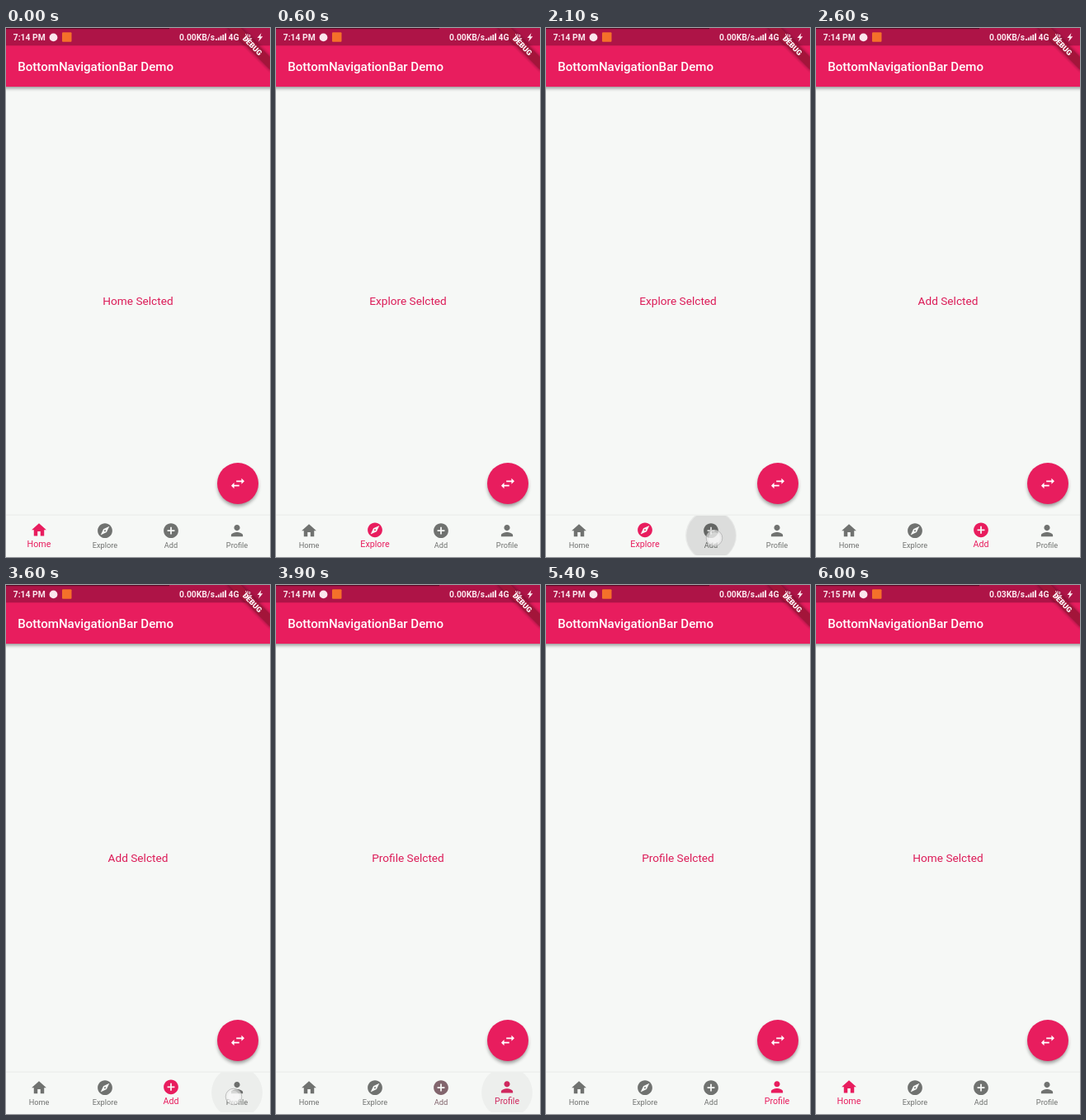
Recreate the animation shown at these times as an HTML page. Size 320 px wide and 640 px high, loop 6100 ms.

```html
<!DOCTYPE html>
<html lang="en">
<head>
<meta charset="utf-8">
<style>
  html, body { margin: 0; height: 100%; overflow: hidden; background: #f6f8f6; }
  svg { display: block; width: 320px; height: 640px; font-family: Roboto, sans-serif; }
  .status { font-size: 10.3px; font-weight: 700; fill: #fbe6ed; }
</style>
</head>
<body>
<svg viewBox="0 0 320 640">
  <defs>
    <filter id="soft" x="-30%" y="-30%" width="160%" height="160%"><feGaussianBlur stdDeviation="2.2"/></filter>
    <clipPath id="bar"><rect y="590" width="320" height="48"/></clipPath>
  </defs>
  <rect width="320" height="640" fill="#f6f8f6"/>

  <rect x="-8" y="20" width="336" height="53" fill="#000" opacity=".4" filter="url(#soft)"/>
  <rect width="320" height="71" fill="#e81d5e"/>
  <rect width="320" height="21.3" fill="#ae1447"/>
  <rect width="198" height="1.2" fill="#5c0a26"/>
  <text x="14.2" y="51.6" font-size="15.1" font-weight="500" fill="#fff" textLength="">BottomNavigationBar Demo</text>

  <g transform="translate(320 0) rotate(45)">
    <rect x="-38" y="24.9" width="76" height="10.7" opacity=".45" filter="url(#soft)"/>
    <rect x="-38" y="24.9" width="76" height="10.7" fill="#a3153a"/>
    <text y="33.4" font-size="9" font-weight="900" fill="#fff" text-anchor="middle">DEBUG</text>
  </g>

  <g class="status">
    <text id="clock" x="8.8" y="15"></text>
    <text id="speed" x="210" y="15"></text>
    <text x="269.5" y="15">4G</text>
    <text x="290" y="10.5" font-size="5.5">Vo</text>
    <text x="289.5" y="15.8" font-size="5.5">LTE</text>
    <circle cx="57.5" cy="11.4" r="4.9"/>
    <rect x="68" y="5.3" width="11.5" height="11.5" rx="1" fill="#f4702a"/>
    <path d="M254 15v-2h1.8v2zm2.8 0v-3.6h1.8v3.6zm2.8 0v-5.4h1.8v5.4zm2.8 0v-7h1.8v7zm2.8 0v-8.6h1.8v8.6z"/>
    <path d="M309.5 6l-5 6h2.8l-1.2 4.5 5.2-6.2h-2.9z"/>
  </g>

  <text id="message" x="160" y="335" font-size="13.65" fill="#dc1c58" text-anchor="middle"></text>

  <circle cx="281" cy="554" r="24.5" opacity=".38" filter="url(#soft)"/>
  <circle cx="281" cy="551" r="25" fill="#e81d5e"/>
  <path transform="translate(270.3 540.3) scale(.889)" fill="#fff"
    d="M6.99 11L3 15l3.99 4v-3H14v-2H6.99v-3zM21 9l-3.99-4v3H10v2h7.01v3L21 9z"/>

  <rect y="588.6" width="320" height="1" fill="#e9ebe9"/>
  <g id="tabs"></g>
  <g clip-path="url(#bar)">
    <circle id="highlight" cy="614" r="31"/>
    <circle id="splash"/>
  </g>
  <g id="touch">
    <circle r="9.8" fill="#f4f4f4" fill-opacity=".6" stroke="#aaa" stroke-opacity=".7"/>
    <circle r="7" fill="#fff" fill-opacity=".4"/>
  </g>
</svg>
<script>
const LOOP = 6100;
const disc = 'M12 2C6.48 2 2 6.48 2 12s4.48 10 10 10 10-4.48 10-10S17.52 2 12 2z';
const tabs = [
  ['Home', 'M10 20v-6h4v6h5v-8h3L12 3 2 12h3v8z'],
  ['Explore', disc + 'm2.19 12.19L6 18l3.81-8.19L18 6l-3.81 8.19zM12 10.9a1.1 1.1 0 1 0 0 2.2 1.1 1.1 0 0 0 0-2.2z'],
  ['Add', disc + 'm5 11h-4v4h-2v-4H7v-2h4V7h2v4h4v2z'],
  ['Profile', 'M12 12c2.21 0 4-1.79 4-4s-1.79-4-4-4-4 1.79-4 4 1.79 4 4 4zm0 2c-2.67 0-8 1.34-8 4v2h16v-2c0-2.66-5.33-4-8-4z']
];
const taps = [
  { tab: 1, down: 100, up: 220, x: 122, y: 618 },
  { tab: 2, down: 1880, up: 2200, x: 204, y: 617 },
  { tab: 3, down: 3500, up: 3750, x: 276, y: 619 },
  { tab: 0, down: 5580, up: 5720, x: 42, y: 621 }
];

const $ = id => document.getElementById(id);
const clamp = v => Math.max(0, Math.min(1, v));
const ease = v => v * v * (3 - 2 * v);
const mix = (a, b, k) => a + (b - a) * k;
const set = (el, attrs) => { for (const k in attrs) el.setAttribute(k, attrs[k]); };
const add = (parent, tag, attrs) => {
  const el = document.createElementNS('http://www.w3.org/2000/svg', tag);
  set(el, attrs);
  return parent.appendChild(el);
};

document.querySelector('[textLength]').removeAttribute('textLength');
const items = tabs.map(([name, d], i) => {
  const icon = add($('tabs'), 'path', { d, 'fill-rule': 'evenodd' });
  const label = add($('tabs'), 'text', { x: 40 + 80 * i, 'text-anchor': 'middle' });
  label.textContent = name;
  return { icon, label, x: 40 + 80 * i };
});

function drawTabs(t) {
  const done = taps.filter(tap => tap.up <= t);
  const last = done.at(-1);
  const current = last ? last.tab : 0;
  const previous = done.length > 1 ? done.at(-2).tab : 0;
  const k = last ? ease(clamp((t - last.up) / 200)) : 1;
  items.forEach(({ icon, label, x }, i) => {
    const on = i === current ? k : i === previous ? 1 - k : 0;
    const fill = `rgb(${mix(112, 232, on)},${mix(114, 29, on)},${mix(112, 94, on)})`;
    set(icon, { fill, transform: `translate(${x - 10.67} ${mix(597.5, 596.6, on)}) scale(.889)` });
    set(label, { fill, y: mix(629.2, 627.7, on), 'font-size': mix(9.2, 10.7, on) });
  });
  $('message').textContent = tabs[current][0] + ' Selcted';
}

function drawTouch(t) {
  const tap = taps.find(p => t >= p.down && t < p.up + 240);
  for (const id of ['highlight', 'splash', 'touch']) $(id).style.display = tap ? '' : 'none';
  if (!tap) return;
  const held = t - tap.down - 20;
  const fade = 1 - clamp((t - tap.up) / 220);
  const grow = ease(clamp((held - 60) / 160));
  const cx = 40 + 80 * tap.tab;
  set($('highlight'), { cx, opacity: .06 * clamp(held / 120) * fade });
  set($('splash'), { cx: mix(tap.x, cx, grow), cy: mix(tap.y, 614, grow), r: 31 * grow, opacity: .05 * fade });
  set($('touch'), { transform: `translate(${tap.x} ${tap.y})`, opacity: t < tap.up ? 1 : clamp(1 - (t - tap.up) / 80) });
}

function frame(now) {
  const t = now % LOOP;
  const late = t >= 5800;
  $('clock').textContent = late ? '7:15 PM' : '7:14 PM';
  $('speed').textContent = late ? '0.03KB/s' : '0.00KB/s';
  drawTabs(t);
  drawTouch(t);
  requestAnimationFrame(frame);
}
frame(0);
</script>
</body>
</html>
```
